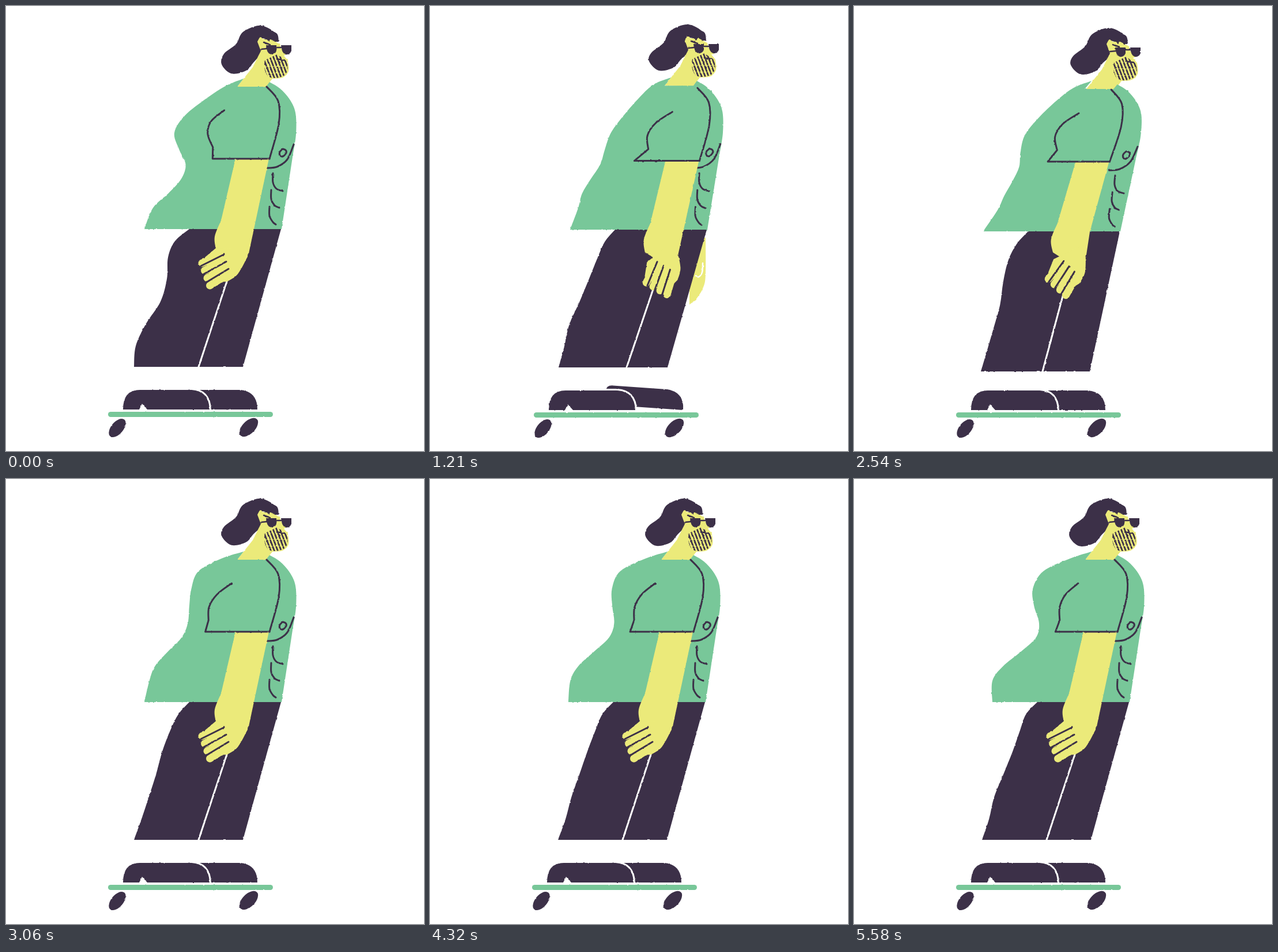
An HTML page that plays this animation: 725x772 px, repeating every 5.71 s.

```html
<!DOCTYPE html>
<html lang="en">
<head>
<meta charset="utf-8">
<title>Skateboarder</title>
<style>
html, body { margin: 0; width: 100%; height: 100%; overflow: hidden; background: #fff; }
svg { display: block; width: 100vw; height: 100vh; }
path { stroke-linecap: round; stroke-linejoin: round; }
</style>
</head>
<body>
<svg viewBox="0 0 725 772">
  <defs>
    <filter id="rough" filterUnits="userSpaceOnUse" x="0" y="0" width="725" height="772" color-interpolation-filters="sRGB">
      <feTurbulence type="fractalNoise" baseFrequency=".22" seed="4"/>
      <feColorMatrix values="1 0 0 0 0  0 1 0 0 0  0 0 1 0 0  0 0 0 0 1" result="noise"/>
      <feDisplacementMap in="SourceGraphic" in2="noise" scale="2.5" xChannelSelector="R" yChannelSelector="G"/>
    </filter>
    <clipPath id="beard"><path d="M449 94L470 84 486 95Q493 112 482 121 468 128 455 123 445 110 449 94Z"/></clipPath>
  </defs>
  <g id="art" filter="url(#rough)"></g>
</svg>
<script>
const GREEN = '#78c799', YELLOW = '#ebea7a', DARK = '#3c3048', BLUE = '#0a70b0', WHITE = '#fff';
const LOOP = 5710, LAST_STEP = 5580, RIPPLE_TIME = 1490 / 6, RIPPLE = 180;
const LEAP = 1740, LANDING = 2280, CRUISE = 2930;

const lerp = (a, b, k) => a + (b - a) * k;
const clamp = v => Math.max(0, Math.min(1, v));
const times = (n, make) => Array.from({ length: n }, (_, i) => make(i));

// Outlines are points: "|" marks a corner between smooth runs, "/" starts a new line.
function spline(points) {
  return points.slice(1).map((end, i) => {
    const start = points[i], before = points[i - 1] || start, after = points[i + 2] || end;
    const c1 = start.map((v, k) => v + (end[k] - before[k]) / 6);
    const c2 = end.map((v, k) => v - (after[k] - start[k]) / 6);
    return `C${c1} ${c2} ${end}`;
  }).join('');
}
function outline(text, closed, place = p => p) {
  return text.split('/').map(part => part.split('|').map((run, i) => {
    const points = run.trim().split(/\s+/).map(p => place(p.split(',').map(Number)));
    return (i ? 'L' : 'M') + points[0] + spline(points);
  }).join('') + (closed ? 'Z' : '')).join('');
}

function add(parent, tag, attrs = {}) {
  const node = document.createElementNS('http://www.w3.org/2000/svg', tag);
  for (const key in attrs) node.setAttribute(key, attrs[key]);
  return parent.appendChild(node);
}
const group = parent => add(parent, 'g');
const shape = (parent, fill, text) => add(parent, 'path', { fill, d: outline(text, true) });
const line = (parent, stroke, text, width = 3) =>
  add(parent, 'path', { fill: 'none', stroke, 'stroke-width': width, d: outline(text) });
const oval = (parent, cx, cy, rx, ry, turn, style = { fill: DARK }) =>
  add(parent, 'ellipse', { cx, cy, rx, ry, transform: `rotate(${turn} ${cx} ${cy})`, ...style });
const ring = { fill: 'none', stroke: DARK, 'stroke-width': 3 };

const art = document.getElementById('art');

// Parts that follow the body: redrawn each frame with their points moved by the pose.
const bodyParts = [];
function flexible(node, text, closed, ripple = 0, lag = 0) {
  bodyParts.push({ node, text, closed, ripple, lag });
  return node;
}
const flexShape = (parent, fill, text, ripple) => flexible(shape(parent, fill, text), text, true, ripple);
const flexLine = (parent, color, text, ripple, lag) => flexible(line(parent, color, text), text, false, ripple, lag);

// Head
const head = group(art);
const hairText = '472,62 465,45 440,34 411,45 399,66 378,83 374,98 391,114 416,109 429,95 443,80 440,56';
const hair = shape(head, DARK, hairText);
shape(head, YELLOW, '401,140|428,106|436,90 442,78|436,62 441,54 446,58|460,58|475,66 478,75 488,82 482,86|489,95 490,113 480,124 462,126|450,142');
shape(head, DARK, '440,54|455,42 470,48 473,62|466,62 460,54|456,62 450,55');
for (const x of [451, 477]) add(head, 'path', { fill: DARK, d: `M${x} 68h18v10q-3 7-10 6-7-2-8-16` });
line(head, DARK, '442,75 452,74/470,72 477,72/447,63 458,67', 2.5);
const beard = add(head, 'g', { 'clip-path': 'url(#beard)', 'stroke-dasharray': '9 3' });
times(9, i => line(beard, DARK, `${438 + 6 * i},84 ${454 + 6 * i},126`, 2.7));
line(head, DARK, '470,92 483,94', 2.7);

// Rider on the board
const rider = group(art);
const pushing = group(rider);
shape(pushing, YELLOW, '510,250|590,235 625,235 631,245 622,254|628,262 618,270|560,285|510,305');
shape(pushing, DARK, '300,430|200,560 150,650|205,690|330,560|400,500');
shape(pushing, DARK, '112,746|87,717 81,697 95,690|180,730 185,746');
const farHand = group(rider);
shape(farHand, YELLOW, '465,402|478,402 478,465 474,488 462,508 450,518|450,470');
line(farHand, WHITE, '473,446 472,462 466,470 461,468', 2.5);

flexShape(rider, DARK, '318,387 296,408 283,436 275,473 264,513 245,552 230,590 222,626|411,626|477,387', .4);
const seamText = '383,478 334,626';
const seam = line(rider, WHITE, seamText);
flexShape(rider, GREEN, '412,126 378,138 341,160 316,190 305,220 308,250 308,275 292,300 270,325 252,350 240,387|478,387|497,262 503,222 502,185 492,162 475,143 457,132|451,140|401,140', 1);
flexLine(rider, DARK, '499,240 488,266 470,279 452,281');
flexLine(rider, DARK, '480,248 485,250 486,255 480,261 475,259 475,253 480,248');
times(3, i => {
  const x = 463 - 3 * i, y = 290 + 29 * i;
  flexLine(rider, DARK, `${x},${y} ${x},${y + 16} ${x + 6},${y + 27} ${x + 17 - 3 * i},${y + 31}`);
});

const arm = group(rider);
flexShape(arm, YELLOW, '398,265|373,372 362,400 364,422|392,440|421,430 430,387|456,265');
const hand = group(arm);
shape(hand, YELLOW, '364,420|345,436|356,480|384,478 402,465 419,435|420,422');
times(4, i => line(hand, YELLOW, `${340 + 4.5 * i},${446 + 13 * i} ${376 + 3 * i},${432 + 11 * i}`, 13));
times(3, i => line(hand, DARK, `${338 + 5 * i},${451 + 14 * i} ${378 + 4 * i},${431 + 12.5 * i}`));
const sleeve = flexLine(arm, DARK, '385,181 361,200 351,222 355,245|352,265|457,265', .5, -40);
flexLine(arm, DARK, '457,265 473,205 472,165 452,140');

const deck = group(rider);
const farShoe = add(deck, 'path', { fill: DARK, d: 'M300 700V676Q300 666 312 666H405Q436 668 436 700Z' });
add(deck, 'path', {
  fill: DARK, stroke: WHITE, 'stroke-width': 6, 'paint-order': 'stroke',
  d: 'M203 700Q203 666 232 666H322Q352 668 353 700H245L236 690 231 700Z'
});
add(deck, 'rect', { x: 177, y: 704, width: 286, height: 9, rx: 4.5, fill: GREEN });
oval(deck, 193, 732, 19, 10.5, -50);
oval(deck, 421, 731, 20, 11, -45);

// Rider in the air
const jumper = group(art);
shape(jumper, YELLOW, '422,146|500,148|505,165 500,190 485,197|422,193');
line(jumper, YELLOW, '490,154 525,153/495,166 527,171/490,178 519,186/480,187 509,198', 13);
line(jumper, WHITE, '482,162 494,161 497,167 490,172 481,171');
shape(jumper, DARK, '210,372|230,367 243,370 250,382|290,465 291,478|255,472|228,408 231,400|219,397');
const flying = group(jumper);
add(flying, 'rect', { x: 210, y: 497, width: 302, height: 79, rx: 38, fill: GREEN, transform: 'rotate(13 361 536)' });
for (const [x, y] of [[256, 491], [227, 551], [459, 536], [447, 596]]) oval(flying, x, y, 16, 10, -22);
shape(jumper, DARK, '237,260|233,300 238,325 255,350 275,356|308,429|405,380|425,402 435,430 441,462 463,509|558,440|481,308|482,285 470,255 445,236 425,233 400,238|335,260');
line(jumper, WHITE, '275,356 310,352 350,335 409,304/405,380 440,360 465,335 481,308');
shape(jumper, DARK, '514,556|511,532 516,516 528,506|595,466 612,459 628,460 641,474|551,531|540,527 540,539');
shape(jumper, YELLOW, '325,36|374,68|376,38');
shape(jumper, GREEN, '212,72|260,45 290,33 315,33 340,40 374,65|372,46|395,44 412,52 425,80 430,100|430,140 420,233|400,238 335,263|203,264|205,235 216,195|222,120');
line(jumper, DARK, '385,125 370,148 350,158 328,160/398,128 402,148 410,162 417,166/407,67 420,79 425,90/372,45 388,51/409,10 412,12');
times(3, i => {
  const x = 382 - 4 * i, y = 179 + 29 * i, left = 348 - 2 * i, top = 171 + 33 * i, tall = 34 - 8 * i;
  line(jumper, DARK, `${left},${top} ${left},${top + tall * .6} ${left + 8},${top + tall * .95} ${left + 20 - 4 * i},${top + tall}`);
  line(jumper, DARK, `${x + 3},${y} ${x},${y + 10} ${x + 2},${y + 20 - 2 * i}`);
  if (i < 2) line(jumper, DARK, `${x + 8},${y} ${x + 6},${y + 10} ${x + 7},${y + 20}/${x + 37},${y + 2} ${x + 35},${y + 15} ${x + 23},${y + 27}`);
});
oval(jumper, 349, 145, 7, 4.5, -12, ring);
oval(jumper, 418, 150, 4.5, 5, 0, ring);
shape(jumper, YELLOW, '211,73|190,83 160,98 152,120 155,140 175,160|220,195 245,199|290,185|300,172 270,152|226,118');
line(jumper, YELLOW, '245,188 263,216/262,185 286,211/268,178 297,201/275,163 302,181', 13);
line(jumper, DARK, '211,73 217,95 226,118/245,132 262,122 299,113');
line(jumper, WHITE, '211,108 225,118', 2.5);
const specks = line(art, BLUE, '113,713 116,716/97,731 102,732/96,746 100,747');

// Poses: offsets from upright cruising; ripple is crest height, length and depth.
const cruise = {
  shoulder: [0, 0], hip: [0, 0], foot: [0, 0], head: [0, 0], arm: [0, 0], deck: [0, 0],
  hand: [0], slack: [0], toe: [0], ripple: [285, RIPPLE, 13]
};
const billow = { ...cruise, ripple: [402, RIPPLE, 13] };
const push = { ...cruise, shoulder: [50, 52], hip: [0, 40], foot: [0, 4], head: [49, 52], arm: [-25, 5], hand: [-10] };
const recoil = {
  ...cruise, shoulder: [6, -2], hip: [3, 1], foot: [1, 1], head: [6, -2], arm: [6, 4], deck: [3, 1],
  hand: [-41], slack: [22], toe: [4], ripple: [288, 235, 18]
};
const land = {
  ...cruise, shoulder: [0, 4], hip: [-16, 4], foot: [-2, 8], head: [2, 4], arm: [-5, 1], deck: [0, 1],
  hand: [-28], slack: [15], ripple: [265, 210, 13]
};
function flutter(t) {
  const crest = (285 + RIPPLE * (t - 3520) / RIPPLE_TIME) % RIPPLE;
  return { ...cruise, ripple: [(crest + RIPPLE) % RIPPLE + RIPPLE, RIPPLE, 13] };
}
const keys = [[0, billow], [30, billow], [290, push], [950, push], [1210, recoil], [1340, recoil],
  [1570, cruise], [LEAP, cruise], [LANDING, land], [2600, land], [CRUISE, flutter(CRUISE)]];

function poseAt(t) {
  if (t >= CRUISE) return flutter(t);
  const i = keys.findIndex(key => key[0] > t);
  const [t0, from] = keys[i - 1], [t1, to] = keys[i];
  const k = (t - t0) / (t1 - t0), pose = {};
  for (const name in from) pose[name] = from[name].map((v, n) => lerp(v, to[name][n], k));
  return pose;
}

const WAIST = 387, NECK = 126, ANKLE = 626;
function lean(pose, [x, y]) {
  const [a, b, k] = y <= WAIST
    ? [pose.shoulder, pose.hip, (y - NECK) / (WAIST - NECK)]
    : [pose.hip, pose.foot, (y - WAIST) / (ANKLE - WAIST)];
  return [x + lerp(a[0], b[0], k), y + lerp(a[1], b[1], k)];
}
// Loose cloth on the back edge: a wave running down, pinned at neck, hem and cuff.
function clothWave({ ripple: [crest, length, depth] }, y, lag) {
  const pinned = Math.min(Math.abs(y - NECK), Math.abs(y - WAIST), Math.abs(y - ANKLE));
  return -depth * clamp(pinned / 35) * Math.cos(2 * Math.PI * (y - crest - lag) / length);
}

const show = (el, on) => el.setAttribute('visibility', on ? 'inherit' : 'hidden');
const move = (el, [x, y], more = '') => el.setAttribute('transform', `translate(${x} ${y}) ${more}`);

function drawRider(pose) {
  for (const { node, text, closed, ripple, lag } of bodyParts) {
    node.setAttribute('d', outline(text, closed, ([x, y]) => {
      const loose = ripple && x < 390 ? ripple * clothWave(pose, y, lag) : 0;
      const slack = node === sleeve && x < 390 && y < 260 ? pose.slack[0] : 0;
      return lean(pose, [x + loose + slack, y]);
    }));
  }
  seam.setAttribute('d', outline(seamText, false, p => {
    const [x, y] = lean(pose, p);
    return [x + pose.arm[0], y];
  }));
  const wrist = [392, 425], [x, y] = lean(pose, wrist);
  move(arm, pose.arm);
  move(hand, [x - wrist[0], y - wrist[1]], `rotate(${pose.hand[0]} ${wrist})`);
  move(deck, pose.deck);
  farShoe.setAttribute('transform', `rotate(${pose.toe[0]} 436 700)`);
}

function draw(time) {
  const t = Math.min(time % LOOP, LAST_STEP);
  const pose = poseAt(t);
  const airborne = t >= LEAP && t < LANDING;
  const bob = 2 - 2 * Math.cos(2 * Math.PI * (pose.ripple[0] - 285) / RIPPLE);
  hair.setAttribute('d', outline(hairText, true, ([x, y]) => [x, y > 90 ? y + bob : y]));
  show(rider, !airborne);
  show(jumper, airborne);
  show(pushing, t >= 160 && t < 1080);
  show(farHand, t >= 1080 && t < 1410);
  show(specks, (t >= 290 && t < 950) || (t >= 1870 && t < 2070));
  if (airborne) {
    const held = 65 * Math.floor((t - LEAP) / 65);
    const fromPeak = (held - 130) / (LANDING - LEAP);
    const drop = 240 * fromPeak ** 2;
    move(jumper, [0, drop]);
    move(head, [-93, drop - 81]);
    flying.setAttribute('transform', `rotate(${-18 * fromPeak} 361 536)`);
  } else {
    drawRider(pose);
    move(head, pose.head);
  }
}

const start = performance.now();
function tick() {
  draw(performance.now() - start);
  requestAnimationFrame(tick);
}
tick();
</script>
</body>
</html>
```
